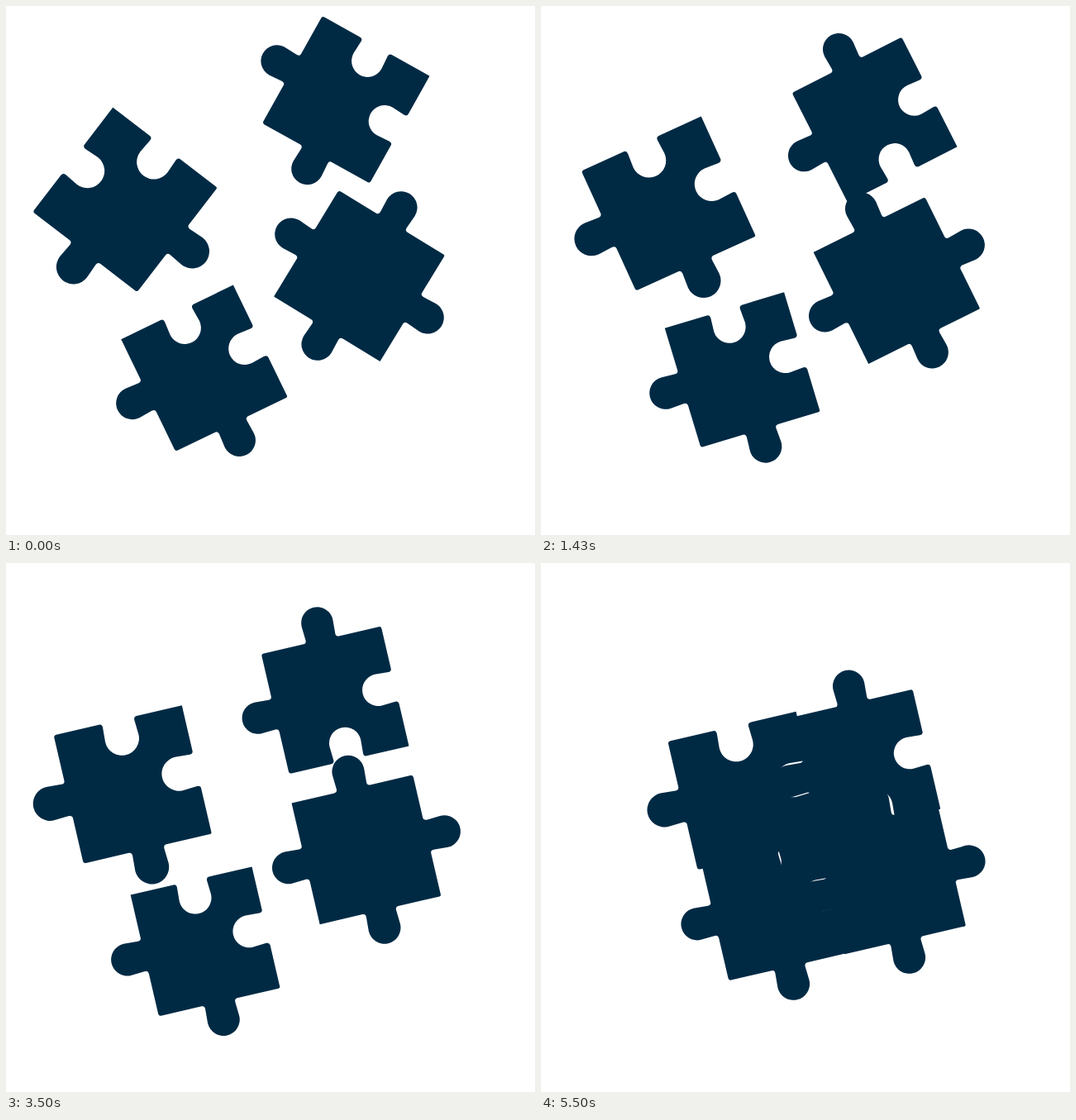
Write an HTML page that moves like this. It is 640 by 640 pixels and loops after 8 s.

```html
<!DOCTYPE html>
<html lang="en">
<head>
<meta charset="utf-8">
<title>Jigsaw</title>
<style>
html, body { margin: 0; width: 100%; height: 100%; overflow: hidden; background: #fff; }
svg { display: block; width: 100%; height: 100%; fill: #002a44; }
</style>
</head>
<body>
<svg id="stage" viewBox="0 0 640 640"></svg>
<script>
const LOOP = 8000, FPS = 14, LAST_STEP = 77;
const HALF = 75, KNOB = 19.5, NECK = 18.5, END_ANGLE = -13.1;

// sides: top, right, bottom, left (1 = tab, -1 = blank); corners: radii clockwise from top left
// from/to: centre while turning; curve: control points of the closing move, relative to "to"
const pieces = [
  { sides: [-1, -1, 1, 1], corners: [3, 0, 2, 3], scale: 1.062, angle: -52.5,
    from: [144, 234.4], to: [158.5, 241], curve: "-21 80 20.5 43 90.5 34.5" },
  { sides: [1, -1, -1, 1], corners: [3, 3, 1, 3], scale: 0.992, angle: -60.8,
    from: [411.3, 113.3], to: [400.5, 147.6], curve: "-3 30 -12 64 -6.5 94.5" },
  { sides: [1, 1, 1, 1], corners: [1, 3, 2, 0], scale: 1.004, angle: -58.6,
    from: [427.5, 326.5], to: [431.6, 334.3], curve: "14 42 24 49 -8 48.6" },
  { sides: [-1, -1, 1, 1], corners: [0, 0, 2, 3], scale: 1.005, angle: -25.9,
    from: [240, 438.2], to: [245.2, 441], curve: "-20 40 36 22 38.3 -26.2" }
];

const svgPath = d => {
  const path = document.createElementNS("http://www.w3.org/2000/svg", "path");
  path.setAttribute("d", d);
  return path;
};

function outline({ sides, corners }) {
  let d = "";
  sides.forEach((kind, i) => {
    const at = (x, y) => {
      for (let n = 0; n < i; n++) [x, y] = [-y, x];
      return `${x} ${y} `;
    };
    const r = corners[i], next = corners[(i + 1) % 4];
    const lip = -HALF - 4 * kind, mid = kind > 0 ? -96.5 : -54;
    d += (i ? "L" : "M") + at(r - HALF, -HALF)
      + "L" + at(-NECK - 3.5, -HALF) + "Q" + at(-NECK, -HALF) + at(-NECK, lip)
      + "L" + at(-KNOB, mid)
      + `A${KNOB} ${KNOB} 0 0 ${kind > 0 ? 1 : 0} ` + at(KNOB, mid)
      + "L" + at(NECK, lip) + "Q" + at(NECK, -HALF) + at(NECK + 3.5, -HALF)
      + "L" + at(HALF - next, -HALF) + "Q" + at(HALF, -HALF) + at(HALF, next - HALF);
  });
  return d + "Z";
}

// cubic-bezier(.81, 0, 0, 1)
function ease(t, start, duration) {
  const x = Math.min(1, Math.max(0, (t - start) / duration));
  let lo = 0, hi = 1;
  for (let i = 0; i < 30; i++) {
    const s = (lo + hi) / 2;
    if (2.43 * s * (1 - s) ** 2 + s ** 3 < x) lo = s; else hi = s;
  }
  return lo * lo * (3 - 2 * lo);
}

const mix = (a, b, p) => a + (b - a) * p;

for (const piece of pieces) {
  piece.el = stage.appendChild(svgPath(outline(piece)));
  piece.route = svgPath("M0 0C" + piece.curve);
  piece.length = piece.route.getTotalLength();
}

function draw(now) {
  const step = Math.min(LAST_STEP, Math.floor((now % LOOP + 5) * FPS / 1000));
  const t = step * 1000 / FPS;
  const turn = ease(t, 125, 2800), close = ease(t, 2340, 3090);
  for (const { el, route, length, from, to, angle, scale } of pieces) {
    const shift = route.getPointAtLength(length * close);
    const x = mix(from[0], to[0], turn) + shift.x;
    const y = mix(from[1], to[1], turn) + shift.y;
    el.setAttribute("transform",
      `translate(${x} ${y}) rotate(${mix(angle, END_ANGLE, turn)}) scale(${scale})`);
  }
}

const begin = performance.now();
function tick() {
  draw(performance.now() - begin);
  requestAnimationFrame(tick);
}
tick();
</script>
</body>
</html>
```
